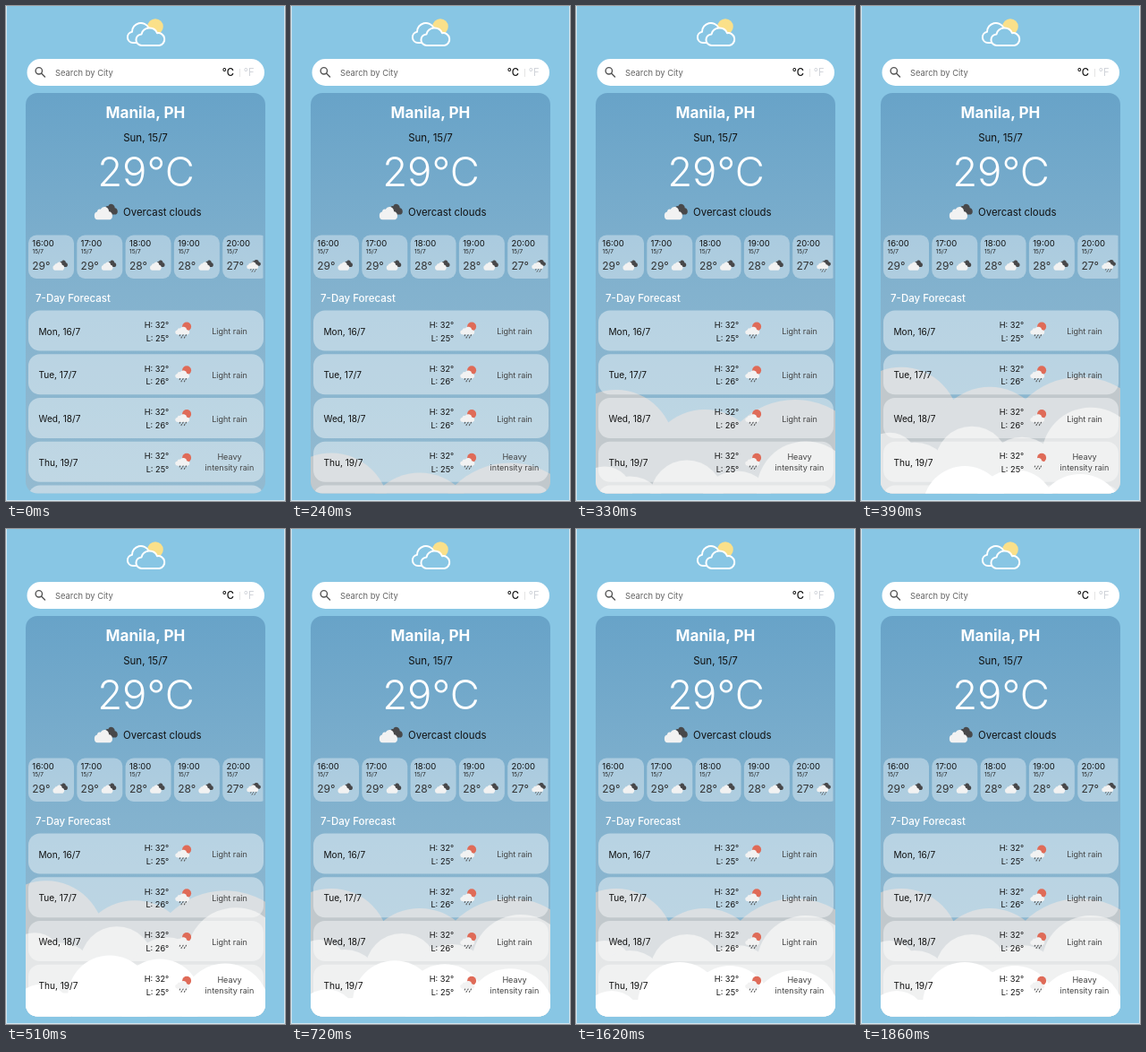
An HTML page for the animation above (1.89 s loop, 312 by 552 pixels).

```html
<!DOCTYPE html>
<html lang="en">
<head>
<meta charset="utf-8">
<title>Weather forecast</title>
<style>
  html, body { margin: 0; width: 100%; height: 100%; overflow: hidden; background: #88c6e4; }
  svg { display: block; width: 100vw; height: 100vh; }
  text { font-family: Inter, Roboto, sans-serif; }
</style>
</head>
<body>
<svg viewBox="0 0 312 552" xmlns="http://www.w3.org/2000/svg">
  <defs>
    <linearGradient id="sky" x1="0" y1="0" x2="0" y2="1">
      <stop offset="0" stop-color="#68a3c8"/>
      <stop offset=".5" stop-color="#83b2ce"/>
      <stop offset="1" stop-color="#93bad0"/>
    </linearGradient>
    <clipPath id="panelClip"><rect x="22" y="97" width="268" height="446.500" rx="13"/></clipPath>
    <clipPath id="hourClip"><rect x="22" y="250" width="265.500" height="60"/></clipPath>
    <path id="puff" d="M-9 6.500a4.200 4.200 0 0 1-.6-8.300 3.600 3.600 0 0 1 4.300-2.700A5.700 5.700 0 0 1 5.200-2.200 4.500 4.500 0 0 1 6.500 6.500z"/>
    <g id="overcast">
      <use href="#puff" fill="#48484a" transform="translate(6 -3) scale(.72 .85)"/>
      <use href="#puff" fill="#f2f2f2" transform="translate(-1.500 1.500) scale(.9 1.050)"/>
    </g>
    <g id="drops" stroke="#555" stroke-width="1.100" stroke-linecap="round">
      <path d="M-3.800 5.200l-.5 1M-.4 5.200l-.5 1M3 5.200l-.5 1M-2 7.600l-.5 1M1.400 7.600l-.5 1"/>
    </g>
    <g id="sunRain">
      <circle cx="3.600" cy="-4" r="5" fill="#df6b58"/>
      <use href="#puff" fill="#f2f2f2" transform="translate(0 .8) scale(.72 .64)"/>
      <use href="#drops"/>
    </g>
    <g id="darkRain">
      <use href="#puff" fill="#48484a" transform="translate(3 -3) scale(.5)"/>
      <use href="#puff" fill="#f2f2f2" transform="translate(-.5 0) scale(.58)"/>
      <use href="#drops" transform="translate(0 -.5) scale(.85)"/>
    </g>
  </defs>

  <rect width="312" height="552" fill="#88c6e4"/>
  <path d="M.5 0V551.500H311.500V0" fill="none" stroke="#e6eff4" stroke-opacity=".8"/>

  <g stroke="#fff" stroke-width="2" stroke-linejoin="round" fill="#88c6e4">
    <circle cx="167" cy="23" r="8.800" fill="#fae08a" stroke="none"/>
    <path d="M149 41h-7a6.200 6.200 0 0 1-1-12.300 9.800 9.800 0 0 1 18.500-4.500z"/>
    <path d="M152 44a6.300 6.300 0 0 1-.5-12.600 9.300 9.300 0 0 1 17.500-1.200 7 7 0 0 1 2.500 13.800z"/>
  </g>

  <rect x="23.500" y="59" width="265.500" height="30" rx="15" fill="#fff"/>
  <g fill="none" stroke="#555" stroke-width="1.400" stroke-linecap="round">
    <circle cx="36.800" cy="72.300" r="3.700"/><path d="M39.700 75.200l3.800 3.800"/>
  </g>
  <path d="M261.500 70v9" stroke="#ddd" stroke-width=".8"/>

  <rect x="22" y="97" width="268" height="446.500" rx="13" fill="url(#sky)"/>
  <g clip-path="url(#panelClip)">
    <g id="clouds"></g>
    <g id="days"></g>
  </g>
  <g id="hours" clip-path="url(#hourClip)"></g>
  <use href="#overcast" transform="translate(112 230)"/>
  <g id="labels"></g>
</svg>
<script>
const NS = 'http://www.w3.org/2000/svg';
const LOOP = 1890, STEP = 30, ENTER = 180;
const byId = id => document.getElementById(id);

function add(parent, tag, attrs, content) {
  const el = document.createElementNS(NS, tag);
  for (const k in attrs) el.setAttribute(k, attrs[k]);
  if (content) el.textContent = content;
  parent.appendChild(el);
  return el;
}

function label(parent, str, x, y, size, fill = '#111', anchor = 'start', weight = 400) {
  add(parent, 'text', { x, y, fill, 'font-size': size, 'text-anchor': anchor, 'font-weight': weight }, str);
}

function icon(parent, id, x, y, scale = 1) {
  add(parent, 'use', { href: '#' + id, transform: `translate(${x} ${y}) scale(${scale})` });
}

// Header and current weather
const head = byId('labels');
label(head, 'Search by City', 55, 78, 9.4, '#666');
label(head, '°C', 241.8, 78, 11.2, '#111', 'start', 500);
label(head, '°F', 265.8, 78, 11.2, '#cfd2d8');
label(head, 'Manila, PH', 156, 125, 17.1, '#fff', 'middle', 700);
label(head, 'Sun, 15/7', 156, 151, 11.5, '#111', 'middle');
label(head, '29°C', 156.5, 201, 45.5, '#fff', 'middle', 300);
label(head, 'Overcast clouds', 131, 234, 11.4);
label(head, '7-Day Forecast', 33, 330, 11.5, '#fff', 'start', 500);

// Hourly cards
[29, 29, 28, 28, 27].forEach((temp, i) => {
  const x = 25 + i * 54.3, g = byId('hours');
  add(g, 'rect', { x, y: 255.5, width: 51, height: 48.5, rx: 9, fill: '#fff', 'fill-opacity': .36 });
  label(g, `${16 + i}:00`, x + 4.3, 268, 9.5);
  label(g, '15/7', x + 4.5, 276.3, 6.5, '#222');
  label(g, temp + '°', x + 4.3, 293.5, 12, '#333');
  if (i < 4) icon(g, 'overcast', x + 35.8, 289.3, .64);
  else icon(g, 'darkRain', x + 35, 289.5);
});

// Daily rows
const DAYS = [
  ['Mon', 25, 'Light rain'],
  ['Tue', 26, 'Light rain'],
  ['Wed', 26, 'Light rain'],
  ['Thu', 25, 'Heavy', 'intensity rain']
];
for (let i = 0; i < 5; i++) {
  const y = 339.5 + i * 48.75, g = byId('days');
  add(g, 'rect', { x: 25, y, width: 263, height: 45, rx: 13, fill: '#fff', 'fill-opacity': .42 });
  if (!DAYS[i]) continue;
  const [day, low, ...sky] = DAYS[i];
  label(g, `${day}, ${16 + i}/7`, 36.5, y + 27, 10.1);
  label(g, 'H: 32°', 182.3, y + 19.3, 9.2, '#111', 'end');
  label(g, `L: ${low}°`, 182.3, y + 34, 9.2, '#111', 'end');
  icon(g, 'sunRain', 198.5, y + 22);
  sky.forEach((s, n) => label(g, s, 250, y + 26.5 - (sky.length - 1) * 6 + n * 11.5, 9.05, '#444', 'middle'));
}

// Cloud banks, back to front; each puff is [cx, cy, r] at rest
const BANKS = [
  { fill: '#c1c8cc', start: 155, puffs: [[45, 466, 65], [144, 488, 65], [245, 500, 88]] },
  { fill: '#e4e6e7', start: 195, puffs: [[32, 490, 31], [60, 512, 42], [124, 493, 41], [180, 505, 41], [257, 486, 55]] },
  { fill: '#ffffff', start: 220, puffs: [[40, 548, 33], [116, 530, 47], [172, 533, 46], [245, 541, 49]] }
];
for (const b of BANKS) {
  b.g = add(byId('clouds'), 'g', { fill: b.fill });
  add(b.g, 'rect', { x: 22, y: 525, width: 268, height: 120 });
  for (const [cx, cy, r] of b.puffs) add(b.g, 'circle', { cx, cy, r });
}

// Underdamped spring from 1 to 0
function spring(ms) {
  const s = Math.max(0, ms) / 1000, damp = 8.5, freq = 9.5;
  return Math.exp(-damp * s) * (Math.cos(freq * s) + damp / freq * Math.sin(freq * s));
}

function render(t) {
  byId('clouds').style.display = t < ENTER ? 'none' : '';
  for (const b of BANKS) b.g.setAttribute('transform', `translate(0 ${(150 * spring(t - b.start)).toFixed(2)})`);
}

const began = performance.now();
function tick() {
  const t = (performance.now() - began) % LOOP;
  render(Math.floor(t / STEP) * STEP);
  requestAnimationFrame(tick);
}
tick();
</script>
</body>
</html>
```
